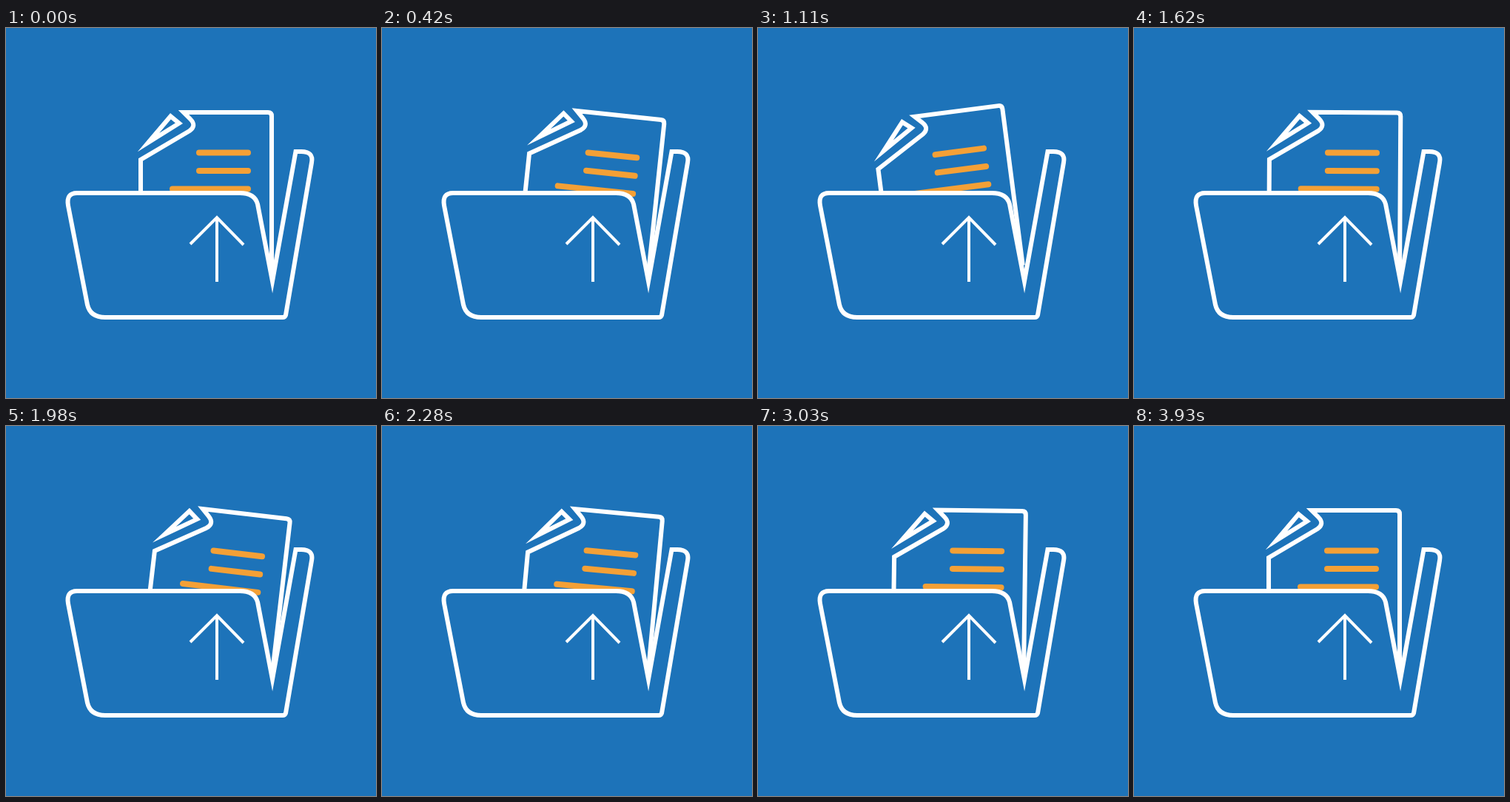
An HTML page for the animation above (5400 ms loop, 500 by 500 pixels).

```html
<!DOCTYPE html>
<html lang="en">
<head>
<meta charset="utf-8">
<title>Folder upload</title>
<style>
  html, body { margin: 0; height: 100%; overflow: hidden; background: #1d73b9; }
  svg { display: block; width: 100%; height: 100%; }
  path { fill: #1d73b9; stroke: #fff; stroke-width: 6; stroke-miterlimit: 10; }
  .text { stroke: #f4a036; stroke-width: 8; stroke-linecap: round; }
  .arrow { fill: none; stroke-width: 4; }
</style>
</head>
<body>
<svg viewBox="0 0 500 500">
  <g id="sheet">
    <path d="M182 300V178L248 139Q258 132 249 123L240 114H354Q359 114 359 119V332"/>
    <path d="M192.5 154.5L222.4 119.2L233.9 128.7Z"/>
    <path class="text" d="M261 168.5H327M261 193H327M225 217.5H327"/>
  </g>
  <path d="M96 223H316Q336 223 340 238L360 342L391.5 167H399Q416 167 413 182L378 388Q377 391 374 391H134Q114 391 110 374L84 240Q81 223 96 223Z"/>
  <path class="arrow" d="M285 343V256M249 292L285 256L321 293"/>
</svg>
<script>
  const LOOP = 5400;
  const sheet = document.getElementById('sheet');

  // Cubic Bezier easing with flat ends: control points (x1, 0) and (x2, 1).
  function ease(u, x1, x2) {
    let low = 0, high = 1, s = 0.5;
    for (let i = 0; i < 24; i++) {
      s = (low + high) / 2;
      const r = 1 - s;
      const x = 3 * x1 * s * r * r + 3 * x2 * s * s * r + s ** 3;
      if (x < u) low = s; else high = s;
    }
    return s * s * (3 - 2 * s);
  }

  // Each swing ends at a time (ms) with an angle (degrees).
  const swings = [
    { end: 540, angle: 6.8, x1: 0.364, x2: 0.636 },
    { end: 1170, angle: -7.7, x1: 0.364, x2: 0.636 },
    { end: 2010, angle: 6.7, x1: 0.364, x2: 0.636 },
    { end: 3900, angle: 0, x1: 0.25, x2: 0.05 }
  ];

  function angleAt(time) {
    let start = 0, from = 0;
    for (const { end, angle, x1, x2 } of swings) {
      if (time < end) {
        return from + (angle - from) * ease((time - start) / (end - start), x1, x2);
      }
      start = end;
      from = angle;
    }
    return from;
  }

  function draw() {
    const angle = angleAt(performance.now() % LOOP);
    sheet.setAttribute('transform', `rotate(${angle.toFixed(3)} 270.5 336)`);
    requestAnimationFrame(draw);
  }
  draw();
</script>
</body>
</html>
```
